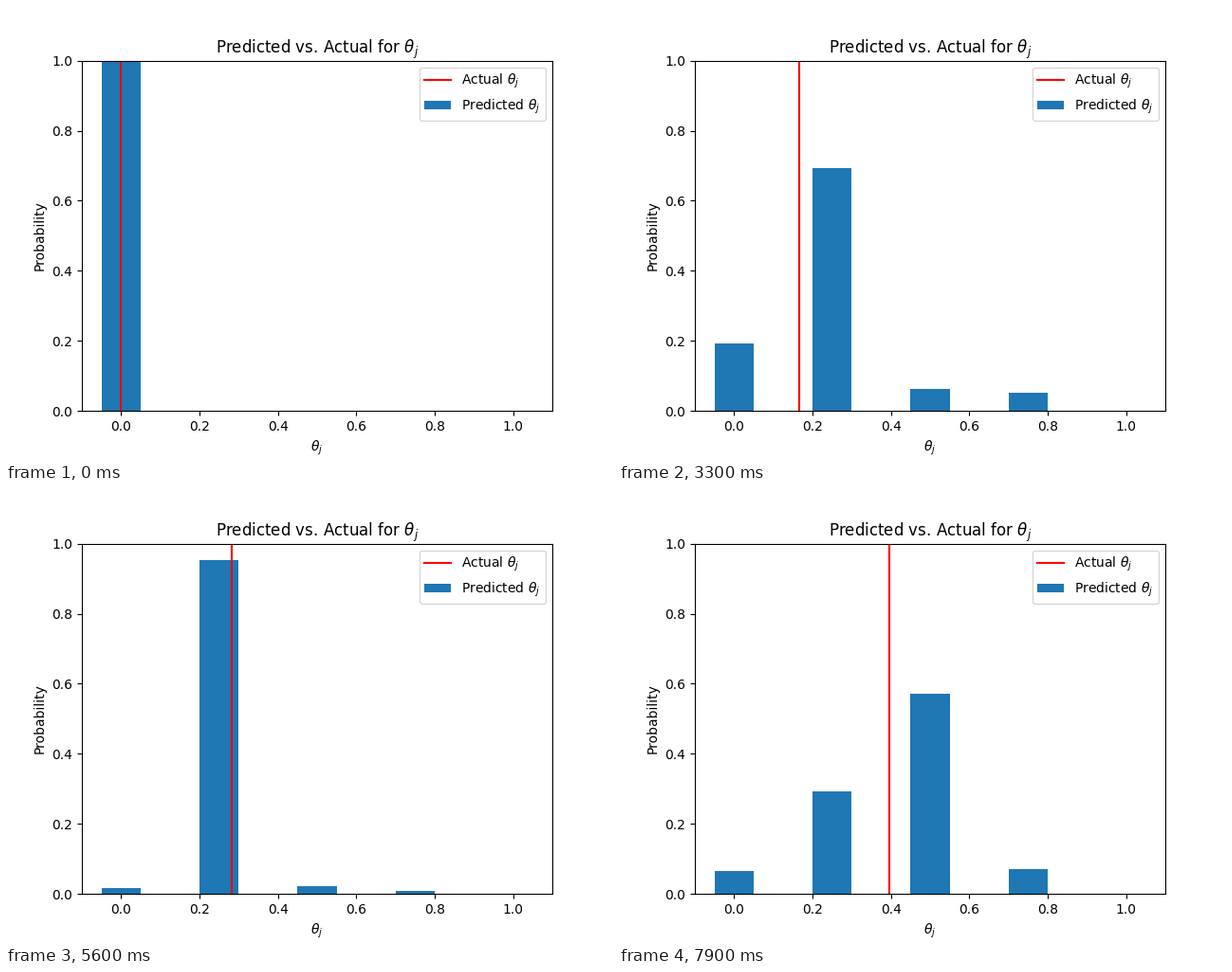
These frames come from a looping animation (640 px wide and 480 px high, 8 s). A matplotlib script:

```python
import numpy as np
import matplotlib.pyplot as plt
from matplotlib.animation import FuncAnimation

FRAMES, INTERVAL = 80, 100
STATES = np.arange(4) / 4
THETAS = np.linspace(0, 1, 200)


def probabilities(theta):
    """Two-qubit phase estimation outcome probabilities."""
    n = np.arange(len(STATES))
    phases = np.exp(2j * np.pi * np.outer(theta - STATES, n))
    return np.abs(phases.mean(axis=1)) ** 2


plt.rcParams["font.family"] = "DejaVu Sans"
fig, ax = plt.subplots(figsize=(6.4, 4.8), dpi=100)
bars = ax.bar(STATES, probabilities(0), width=0.1, color="tab:blue",
              label=r"Predicted $\theta_j$")
actual = ax.axvline(0, color="red", label=r"Actual $\theta_j$")

ax.set_xlim(-0.1, 1.1)
ax.set_ylim(0, 1)
ax.set_xlabel(r"$\theta_j$")
ax.set_ylabel("Probability")
ax.set_title(r"Predicted vs. Actual for $\theta_j$", pad=5.28)
ax.legend(handles=[actual, bars], loc="upper right")


def update(step):
    theta = THETAS[step]
    for bar, height in zip(bars, probabilities(theta)):
        bar.set_height(height)
    actual.set_xdata([theta, theta])
    return [*bars, actual]


anim = FuncAnimation(fig, update, frames=FRAMES, interval=INTERVAL,
                     repeat=True, repeat_delay=0, blit=False)
plt.show()
```
